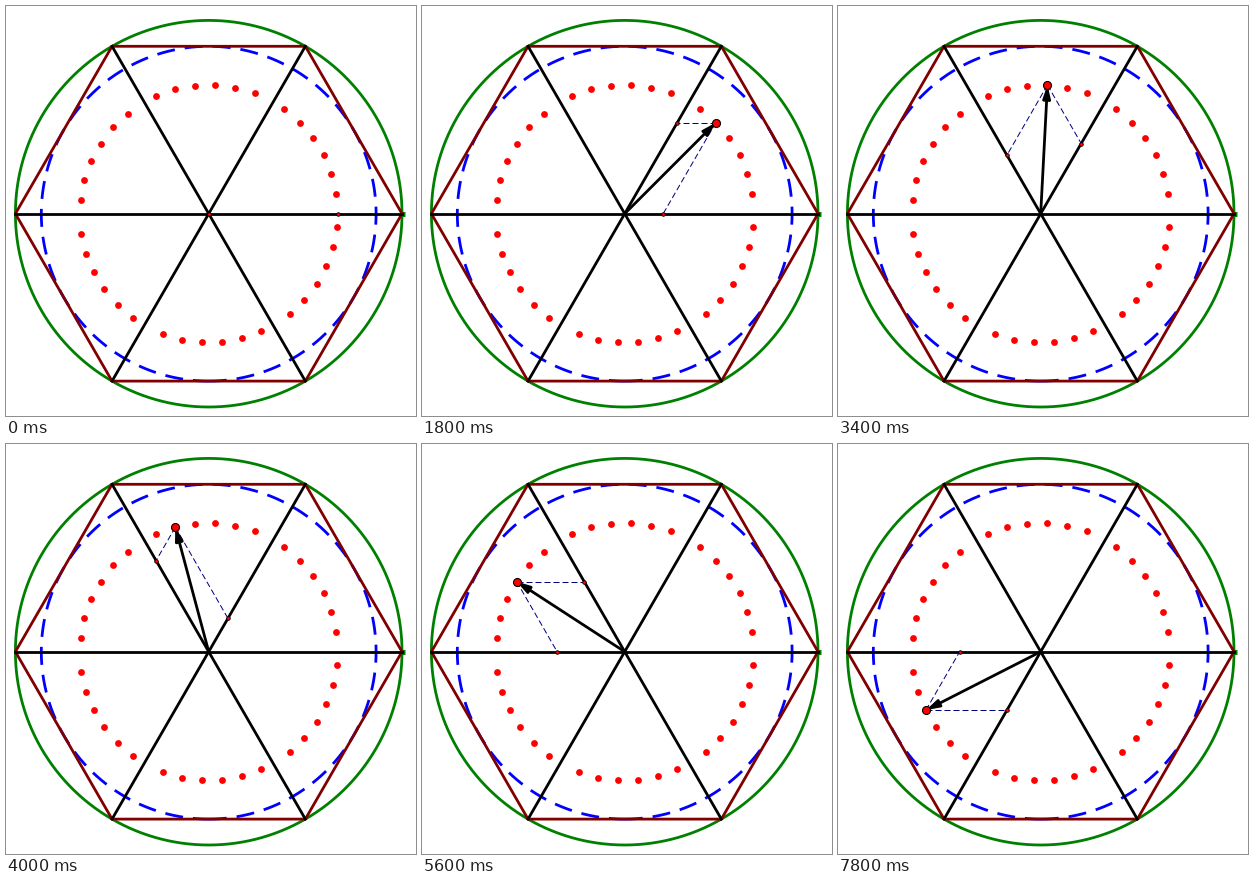
Write a matplotlib script that moves like this. It is 410 by 410 pixels and loops after 8 s.

```python
import numpy as np
import matplotlib.pyplot as plt
from matplotlib.animation import FuncAnimation
from matplotlib.patches import FancyArrowPatch

SIZE, DPI = 410, 100
CX, CY = 202.7, 207.7          # centre of the drawing, pixels from top left
R = 193.3                      # circumscribed circle
R_IN = R * np.sqrt(3) / 2      # inscribed circle
R_VEC = R * 2 / 3              # length of the vector
SECTOR, STEP, PER_SECTOR = 60, 9, 7
TICK = 100
LW = 2
# times, in ticks, at which the vector takes its next position
CHANGES = [5, 8, 12, 15, 18, 22, 24, 27, 30, 34, 37, 40, 44, 46, 49, 52,
           56, 59, 63, 66, 69, 72, 75, 78]


def polar(radius, degrees):
    a = np.radians(degrees)
    return np.array([radius * np.cos(a), radius * np.sin(a)])


def pt(px):
    return px * 72 / DPI


# the small excess keeps the pixel size from rounding down
side = (SIZE + 0.001) / DPI
fig = plt.figure(figsize=(side, side), dpi=DPI, facecolor="white")
ax = fig.add_axes([0, 0, 1, 1])
ax.set_xlim(-CX, SIZE - CX)
ax.set_ylim(CY - SIZE, CY)
ax.axis("off")

# Fixed geometry
turn = np.linspace(0, 360, 721)
ax.plot(*polar(R_IN, turn - 90), color="blue", lw=LW, zorder=1,
        linestyle=(0, (pt(18) / LW, pt(10) / LW)), dash_capstyle="butt")
ax.plot(*polar(R, turn), color="green", lw=LW, zorder=2)
ax.plot([R, R + 2.6], [0, 0], color="green", lw=pt(5),
        solid_capstyle="butt", zorder=2)
ax.plot(*polar(R, np.arange(0, 361, SECTOR)), color="maroon", lw=LW, zorder=2)
for angle in (0, 60, 120):
    end = polar(R, angle)
    ax.plot([-end[0], end[0]], [-end[1], end[1]], color="black", lw=LW, zorder=3)

ring = [SECTOR * k + STEP * j for k in range(6) for j in range(1, PER_SECTOR)]
ax.plot(*polar(R_VEC, np.array(ring)), "o", color="red", ms=pt(6.8), mew=0, zorder=4)

# Moving parts
guides = [ax.plot([], [], color="navy", lw=pt(1), linestyle=(0, (6, 3)),
                  dash_capstyle="butt", zorder=4)[0] for _ in range(2)]
feet, = ax.plot([], [], "o", mfc="red", mec="black", ms=pt(3.6), mew=pt(0.8), zorder=6)
tip_dot, = ax.plot([], [], "o", mfc="red", mec="black", ms=pt(8), mew=pt(1.1), zorder=6)
arrow = FancyArrowPatch((0, 0), (R_VEC, 0), shrinkA=0, shrinkB=0, mutation_scale=1,
                        arrowstyle="-|>,head_length=7.5,head_width=2.2",
                        color="black", lw=LW, zorder=5)
ax.add_patch(arrow)


def update(i):
    pose = sum(i >= t for t in CHANGES)
    sector, j = divmod(pose, PER_SECTOR)
    base, offset = SECTOR * sector, STEP * j
    tip = polar(R_VEC, base + offset)

    # Components along the two edges of the sector
    scale = R_VEC / np.sin(np.radians(SECTOR))
    a = polar(scale * np.sin(np.radians(SECTOR - offset)), base)
    b = polar(scale * np.sin(np.radians(offset)), base + SECTOR)
    feet.set_data([a[0], b[0]], [a[1], b[1]])
    for line, foot in zip(guides, (a, b)):
        line.set_data([tip[0], foot[0]], [tip[1], foot[1]])
    tip_dot.set_data([tip[0]], [tip[1]])
    arrow.set_positions((0, 0), tuple(tip))

    # On a sector edge only the feet are shown
    for part in (*guides, tip_dot, arrow):
        part.set_visible(j > 0)
    return (*guides, feet, tip_dot, arrow)


anim = FuncAnimation(fig, update, frames=80, interval=TICK, repeat=True,
                     repeat_delay=0, blit=False)
plt.show()
```
